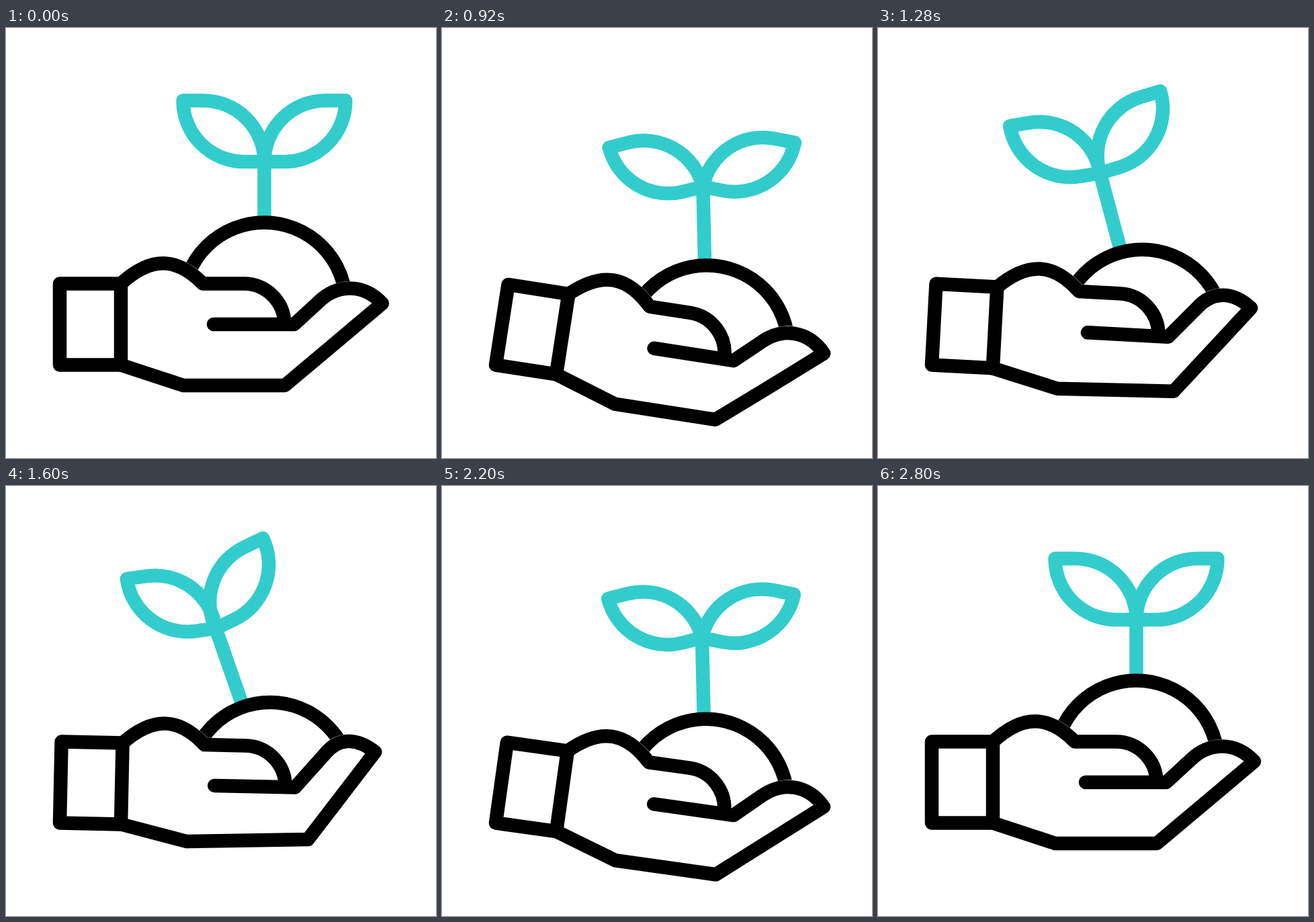
An HTML page for the animation above (3 s loop, 640 by 640 pixels).

```html
<!DOCTYPE html>
<html lang="en">
<head>
<meta charset="utf-8">
<title>Sprout in hand</title>
<style>
  html, body { margin: 0; width: 100%; height: 100%; overflow: hidden; background: #fff; }
  svg { display: block; width: 100vw; height: 100vh; }
  .ink { fill: none; stroke: #000; stroke-width: 20.5; stroke-linecap: round; stroke-linejoin: round; }
  .leaf { fill: none; stroke: #33cccc; stroke-width: 20.5; stroke-linejoin: round; }
  .seam { fill: #fff; stroke: #fff; stroke-width: 21.1; stroke-linejoin: round; }
</style>
</head>
<body>
<svg viewBox="0 0 640 640">
  <g id="plant">
    <path id="stem" class="leaf" d="M0 0V150"/>
    <path id="left" class="leaf" d="M-121 -91H-91A91 91 0 0 1 0 0H-30A91 91 0 0 1 -121 -91Z"/>
    <path id="right" class="leaf" d="M121 -91H91A91 91 0 0 0 0 0H30A91 91 0 0 0 121 -91Z"/>
  </g>
  <path id="mound" class="ink" style="fill:#fff;stroke-linecap:butt" d="M-121.5 0A121.5 121.5 0 0 1 121.5 0"/>
  <g id="hand">
    <path id="palm" class="seam"/>
    <path id="lines" class="ink"/>
    <path class="ink" d="M80 380.5H171V501.5H80Z"/>
  </g>
</svg>
<script>
const LOOP = 3000, STEP = 40;
const el = id => document.getElementById(id);
const mix = (a, b, p) => a + (b - a) * p;
const ease = p => p * p * (3 - 2 * p);

// hand angle, mound centre x/y, stem reach and tilt, leaf angles, finger curl
const rest  = [0,   384.5, 411,   212,   0,     0,     0,     0];
const low   = [8.9, 394,   475,   238.5, -1.1,  -14.4, 11.8,  0];
const high  = [0.7, 393,   441.5, 245.5, -20.6, -7.3,  -28.2, 1];
const again = [8.3, 393,   470.4, 243.5, -1.4,  -14.9, 12.2,  0];
const keys = [[0, rest], [80, rest], [560, low], [880, low], [1500, high],
              [2120, again], [2800, rest], [LOOP, rest]];

function poseAt(t) {
  let i = 0;
  while (i < keys.length - 2 && t >= keys[i + 1][0]) i++;
  const [t0, a] = keys[i], [t1, b] = keys[i + 1];
  const p = ease((t - t0) / (t1 - t0));
  return a.map((v, k) => mix(v, b[k], p));
}

function drawHand(curl) {
  const pt = (x, y, dx, dy) => [x + dx * curl, y + dy * curl];
  const tip = pt(560, 410, -14, -26);
  const heel = pt(415, 532, 37.5, -15);
  const wrist = pt(264, 532, 6.3, -7.5);
  const sag = Math.max(0, curl * (0.71 - curl)) * 66;
  const side = p => [mix(tip[0], heel[0], p) + sag * 0.62, mix(tip[1], heel[1], p) + sag * 0.78];
  const bump = [pt(466, 407, 7, -18), pt(493, 381, -3, -15), pt(532, 380, -16, -18), tip];
  const thumb = 'M171 380.5C215 340 253 340 293 380.5H354A60.5 60.5 0 0 1 414.5 441';
  const fingers = `L429 441L${bump[0]}C${bump.slice(1).join(' ')}` +
    `C${side(0.24)} ${side(0.54)} ${heel}L${wrist}L171 501.5`;
  el('palm').setAttribute('d', thumb + fingers + 'Z');
  el('lines').setAttribute('d', thumb + 'M309 441' + fingers);
}

function draw(t) {
  const [angle, cx, cy, reach, tilt, left, right, curl] = poseAt(t);
  const set = (id, v) => el(id).setAttribute('transform', v);
  const rad = tilt * Math.PI / 180;
  set('hand', `rotate(${angle} 80 501.5)`);
  set('mound', `translate(${cx} ${cy})`);
  set('plant', `translate(${cx + reach * Math.sin(rad)} ${cy - reach * Math.cos(rad)})`);
  set('stem', `rotate(${tilt})`);
  set('left', `rotate(${left})`);
  set('right', `rotate(${right})`);
  drawHand(curl);
}

const start = performance.now();
function tick(now) {
  const t = Math.max(0, now - start) % LOOP;
  draw(Math.floor(t / STEP) * STEP);
  requestAnimationFrame(tick);
}
draw(0);
requestAnimationFrame(tick);
</script>
</body>
</html>
```
